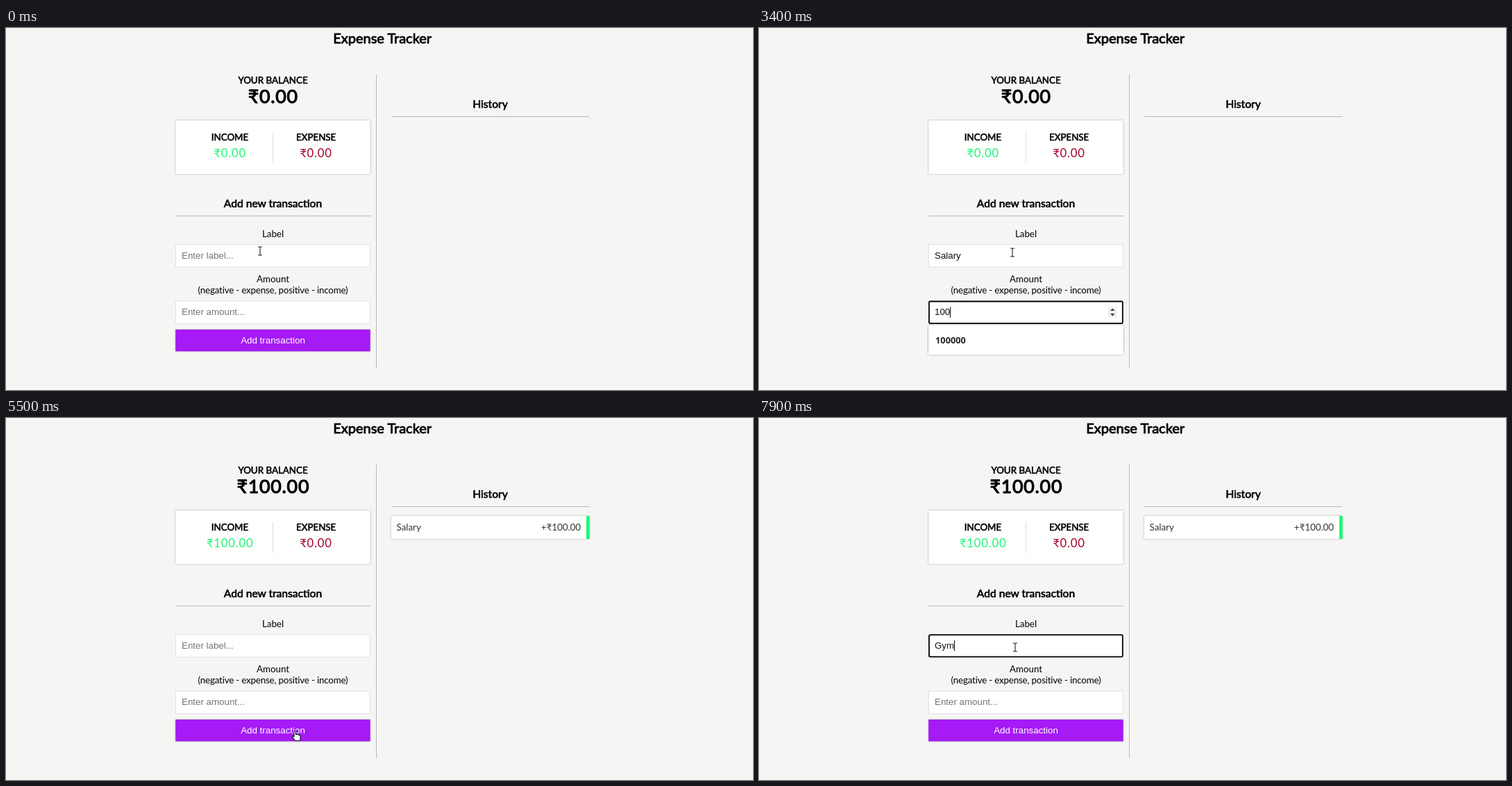
These frames come from a looping animation (1076x521 px, 8 s). An HTML page:

```html
<!DOCTYPE html>
<html lang="en">
<head>
<meta charset="utf-8">
<title>Expense Tracker</title>
<style>
html, body { margin: 0; width: 100%; height: 100%; overflow: hidden; background: #f5f5f4; }
svg { display: block; width: 1076px; height: 521px; }
text { font: 13.33px Lato, sans-serif; fill: #000; white-space: pre; }
.mid { text-anchor: middle; }
/* regular outlines thickened, as a browser does when no bold face is loaded */
.b { stroke: #000; stroke-width: .042em; stroke-linejoin: round; }
.title { font-size: 20px; }
.h3 { font-size: 15.6px; }
.total { font-size: 26.67px; letter-spacing: .83px; }
.money { font-size: 16.67px; letter-spacing: .83px; }
.note { letter-spacing: -.18px; }
.ui { font-family: "Liberation Sans", Arial, sans-serif; }
.pop { font: 600 12.8px "Noto Sans", sans-serif; fill: #222; }
.card { fill: #fffffe; filter: drop-shadow(0 .8px .8px rgba(0,0,0,.24)) drop-shadow(0 .8px 1.2px rgba(0,0,0,.12)); }
.rule { stroke: #b8b8b8; }
.gain { fill: #1df57a; }
.loss { fill: #a3002e; }
.item { fill: #333; }
.on { fill: #fff; }
</style>
</head>
<body>
<svg viewBox="0 0 1076 521">
  <rect width="1076" height="521" fill="#f5f5f4"/>
  <text class="mid b title" x="542.2" y="22.2">Expense Tracker</text>
  <text class="mid b" x="384.5" y="80">YOUR BALANCE</text>
  <text class="mid b total" id="total" x="384.8" y="108"></text>
  <rect class="card" x="244.2" y="133" width="280.4" height="77"/>
  <path d="M384.5 150V194" stroke="#dedede"/>
  <text class="mid b" x="322.5" y="162">INCOME</text>
  <text class="mid money gain" id="income" x="322.7" y="186"></text>
  <text class="mid b" x="446.7" y="162">EXPENSE</text>
  <text class="mid money loss" x="446.5" y="186">₹0.00</text>
  <text class="mid b h3" x="384.5" y="258">Add new transaction</text>
  <path class="rule" d="M244 270.5H525M533.5 67V490M555 127.5H840"/>
  <text class="mid" x="384.5" y="301">Label</text>
  <text class="mid" x="384.5" y="366">Amount</text>
  <text class="mid note" x="384.5" y="382">(negative - expense, positive - income)</text>
  <text class="mid b h3" x="697.5" y="115">History</text>

  <g id="entry">
    <rect class="card" x="555" y="141" width="285.5" height="33"/>
    <rect x="836" y="141" width="4.5" height="33" fill="#12fa74"/>
    <text class="item" x="562.5" y="162.3">Salary</text>
    <text class="item" x="828" y="162.3" text-anchor="end">+₹100.00</text>
  </g>

  <rect class="card" x="244.2" y="434" width="280.4" height="31.3" style="fill:#a51af5"/>
  <text class="mid ui on" x="384.5" y="454">Add transaction</text>

  <g id="label"></g>
  <g id="amount"></g>
  <g id="popup">
    <rect class="card" x="-140.5" y="-21.5" width="281" height="43" rx="2"/>
    <text class="pop" id="hint" x="-130.5" y="5"></text>
  </g>

  <g id="beam" fill="none">
    <path d="M-3-6H-1L0-5L1-6H3M0-5V5M-3 6H-1L0 5L1 6H3" stroke="#fff" stroke-width="2.4" opacity=".7"/>
    <path d="M-3-6H-1L0-5L1-6H3M0-5V5M-3 6H-1L0 5L1 6H3" stroke="#222" stroke-width="1.1"/>
  </g>
  <path id="hand" fill="#fff" stroke="#111" stroke-width="1.1" stroke-linejoin="round"
    d="M-3 2V-5.5Q-3-7-1.8-7T-.6-5.5V-1.5Q.5-2.6 1.7-1.2Q3-2 4-.6Q5.8-1 6 .8V4Q6 6 4.8 7.5H-1.5Q-3 5.5-5.6 2.2Q-6 .8-4.8.7Q-3.8.8-3 2Z"/>
</svg>
<script>
const $ = id => document.getElementById(id);
const LOOP = 8000, STEP = 100;

// value of the last [time, value] entry already reached
const at = (keys, t) => keys.reduce((v, k) => t >= k[0] ? k[1] : v, keys[0][1]);

const typedLabel = [[0, ''], [1200, 'S'], [1300, 'Sa'], [1600, 'Sal'], [1700, 'Sala'],
  [2200, 'Salar'], [2300, 'Salary'], [5500, ''], [7500, 'G'], [7800, 'Gy'], [7900, 'Gym']];
const typedAmount = [[0, ''], [2900, '1'], [3200, '10'], [3400, '100'], [5500, '']];
const focus = [[0, ''], [700, 'label'], [2400, 'amount'], [5200, ''], [6500, 'label']];
const caretOn = [[0, true], [4400, false], [6500, true], [7200, false], [7500, true]];
const popups = [
  { from: 3000, fade: 4400, y: 449, text: '100000' },
  { from: 6600, fade: 7600, y: 368, text: 'Salary' }
];

// pointer path: time, x, y
const path = [[0, 366, 321], [200, 366, 321], [300, 365.5, 323], [400, 365.5, 323], [500, 365, 323],
  [4500, 365, 323], [5000, 417, 456], [5200, 417, 456], [5300, 418, 457], [5700, 418, 457],
  [5800, 420, 451], [5900, 420, 451], [6000, 440, 405], [6100, 440, 405], [6400, 369, 330], [LOOP, 369, 330]];

function pointer(t) {
  const i = path.findIndex(p => p[0] > t);
  const a = path[i - 1], b = path[i];
  const u = (t - a[0]) / (b[0] - a[0]), e = u * u * (3 - 2 * u);
  return [a[1] + (b[1] - a[1]) * e, a[2] + (b[2] - a[2]) * e];
}

const measure = document.createElement('canvas').getContext('2d');
measure.font = '13.33px "Liberation Sans", Arial, sans-serif';

// y is the top edge of the field
function field(id, y, value, hint, focused, caret, spin) {
  const box = focused
    ? `<rect x="245" y="${y + .9}" width="278.8" height="31.6" rx="1.6" fill="#fffffd" stroke="#000" stroke-width="1.8"/>`
    : `<rect x="244.6" y="${y + .5}" width="279.6" height="32.4" fill="#fffffd" stroke="#dedede" stroke-width=".9"/>`;
  const cx = Math.round(253 + measure.measureText(value).width) + .5;
  const arrows = `<rect x="503" y="${y + 9}" width="12.5" height="15" fill="#efefef"/>
    <path d="M506 ${y + 14.5}h6.6l-3.3-3.6zM506 ${y + 18.5}h6.6l-3.3 3.6z" fill="#444"/>`;
  $(id).innerHTML = box
    + `<text class="ui" x="253" y="${Math.round(y + 20.8)}" style="fill:${value ? '#111' : '#757575'}">${value || hint}</text>`
    + (focused && caret ? `<path d="M${cx} ${y + 9}v15" stroke="#000"/>` : '')
    + (spin ? arrows : '');
}

function popup(t) {
  const p = popups.find(p => t >= p.from && t < p.fade + 2 * STEP);
  $('popup').style.display = p ? '' : 'none';
  if (!p) return;
  const out = t < p.fade ? 0 : (t - p.fade) / STEP + 1;
  $('popup').setAttribute('transform', `translate(384.5 ${p.y}) scale(${1 - .025 * out})`);
  $('popup').setAttribute('opacity', 1 - .45 * out);
  $('hint').textContent = p.text;
}

function draw(t) {
  const active = at(focus, t), caret = at(caretOn, t), paid = t >= 5500;
  const [x, y] = pointer(t);
  const over = (top, bottom) => y > top && y < bottom;
  field('label', 311.2, at(typedLabel, t), 'Enter label...', active === 'label', caret, false);
  field('amount', 392.6, at(typedAmount, t), 'Enter amount...', active === 'amount', caret,
    active === 'amount' || over(393, 426));
  popup(t);
  $('total').textContent = $('income').textContent = paid ? '₹100.00' : '₹0.00';
  $('entry').style.display = paid ? '' : 'none';
  const onButton = over(434, 466);
  $('hand').style.display = onButton ? '' : 'none';
  $('beam').style.display = onButton ? 'none' : '';
  $(onButton ? 'hand' : 'beam').setAttribute('transform', `translate(${x} ${y})`);
}

let shown = -1;
function tick() {
  const t = Math.floor(performance.now() % LOOP / STEP) * STEP;
  if (t !== shown) draw(shown = t);
  requestAnimationFrame(tick);
}
tick();
</script>
</body>
</html>
```
